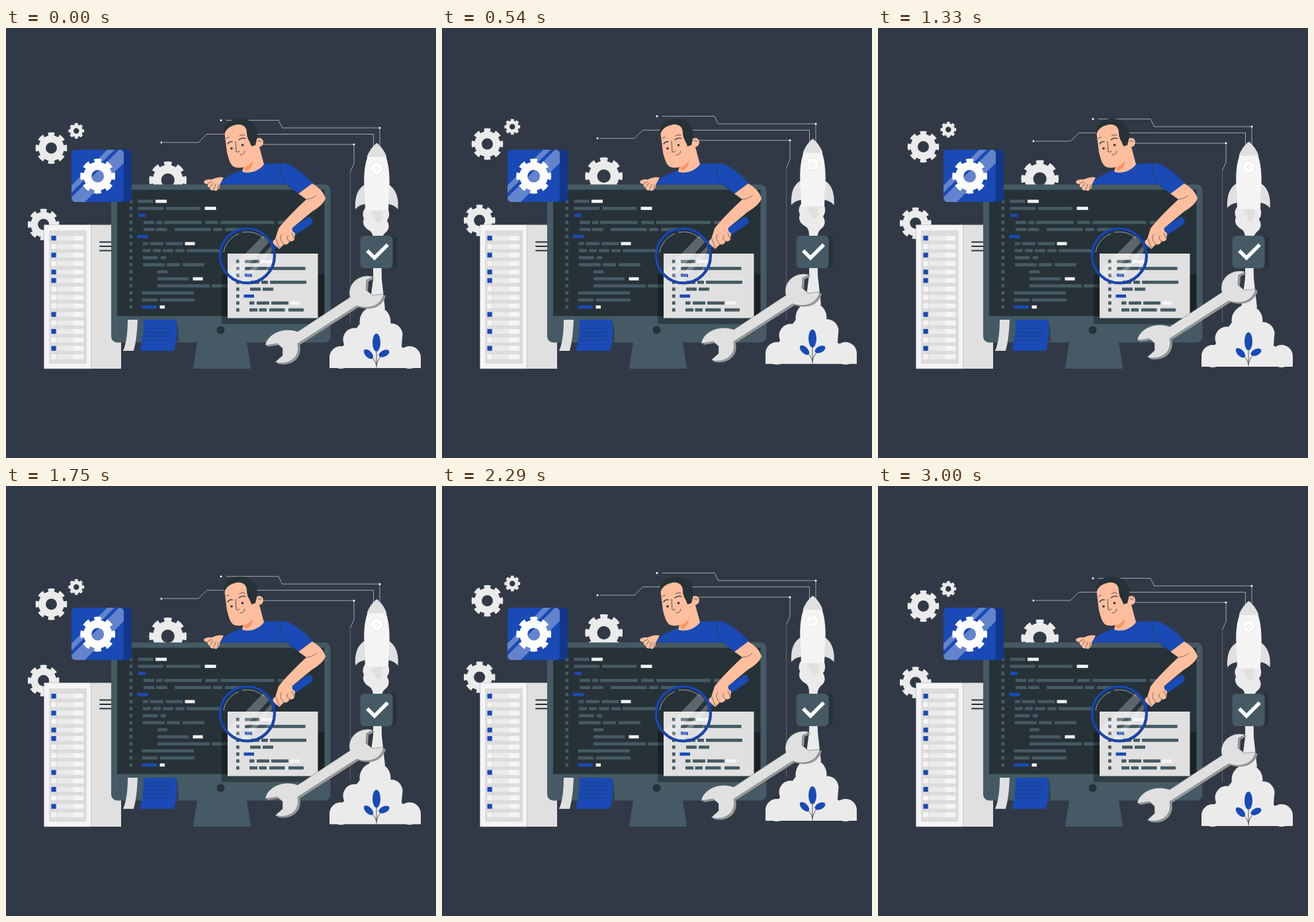
Animation, 650 px wide and 650 px high, one loop 3040 ms. Source, as an HTML page:

```html
<!DOCTYPE html>
<html lang="en">
<head>
<meta charset="utf-8">
<title>Debugging scene</title>
<style>
html, body { margin: 0; width: 100%; height: 100%; overflow: hidden; background: #323946; }
svg { display: block; width: 100vw; height: 100vh; }
.slate { fill: #455a64; }
.dark { fill: #263238; }
.blue { fill: #194ab5; }
.skin { fill: #ffbe9d; }
.grey { fill: #e0e0e0; }
.light { fill: #ebebeb; }
.pale { fill: #f5f5f5; }
.ink { fill: none; stroke: #263238; stroke-linecap: round; stroke-linejoin: round; }
.wire { fill: none; stroke: #d5d7da; stroke-width: .7; }
</style>
</head>
<body>
<svg viewBox="0 0 650 650">
<defs>
  <g id="gear" fill="none">
    <circle r="13.9" stroke-width="10.8"/>
    <circle r="21" stroke-width="5.6" pathLength="16" stroke-dasharray="1.15 .85" stroke-dashoffset=".575"/>
  </g>
  <path id="wrench" d="M555 376C537 371 519 383 519 401Q519 405 520 407L441 459C425 453 402 457 393 475L392 480L410 477L418 484V495L407 505C425 511 446 499 441 477L530 420C551 427 568 418 571 402L554 404L544 396L545 381Z"/>
  <clipPath id="card"><rect x="99" y="184" width="79" height="79" rx="6"/></clipPath>
  <clipPath id="lens"><circle cx="364.500" cy="344.500" r="39"/></clipPath>
</defs>

<g id="float">
  <g stroke="#ebebeb">
    <use href="#gear" transform="translate(68.500 181.500)"/>
    <use href="#gear" transform="translate(106.300 155.500) scale(.5)"/>
    <use href="#gear" transform="translate(244.700 230) scale(1.19)"/>
    <use href="#gear" transform="translate(56.700 297)"/>
  </g>
  <path class="wire" d="M333 139.500H412L417.500 151H565V180M238 173H291L303.500 160.500H555.500V185M380 176H526V205L520.500 217"/>
  <path class="wire" opacity=".4" d="M520.500 217V447"/>
  <g fill="#fff">
    <circle cx="325" cy="139.500" r="1.500"/><circle cx="235" cy="173" r="1.500"/>
    <circle cx="565" cy="151" r="1.500"/><circle cx="526" cy="176" r="1.500"/>
  </g>
  <!-- smoke -->
  <g class="light">
    <path d="M543 272H577Q582 283 576 291Q582 302 574 309Q568 313 567 324L568 380L573 425H549L555 380V320Q555 309 549 306Q537 299 541 288Q537 280 543 272Z"/>
    <circle cx="558" cy="444" r="23.500"/>
    <circle cx="527" cy="471" r="17.500"/><circle cx="582" cy="464" r="17.500"/>
    <circle cx="506" cy="498" r="17"/><circle cx="610" cy="498" r="17"/>
    <path d="M489 514V498L510 480L535 447H581L599 467L598 482L627 499V514Z"/>
  </g>
  <path class="grey" d="M553 276H569V288Q565 297 559 293Q558 285 552 283Z"/>
  <!-- rocket -->
  <path class="grey" d="M542 237C532 243 527 254 528 274Q534 267 543 266ZM579 237C588 243 594 254 592.500 274Q586 267 578 266Z"/>
  <path class="pale" d="M560.500 174C547 184 540 207 541.500 239L543 275.500H578L579.500 239C581 207 574 184 560.500 174Z"/>
  <path class="grey" d="M560.500 174Q550 182 545.500 195H575.500Q571 182 560.500 174Z"/>
  <circle cx="560.300" cy="212" r="9.500" fill="#fff" stroke="#e4e4e4"/>
  <path d="M555 215L562 208M559 217L565 211" stroke="#ebebeb" stroke-width="1.500"/>
  <path d="M543 251H578M543 264H578" stroke="#ebebeb" stroke-width=".6"/>
  <!-- sprout -->
  <path class="ink" stroke-width=".8" d="M560 476V513M560 509Q563 497 573 491M560 510Q558 500 547 493"/>
  <g class="blue">
    <ellipse rx="6" ry="13.500" transform="translate(560 475.500)"/>
    <ellipse rx="8.500" ry="4.800" transform="translate(571.500 492) rotate(-25)"/>
    <ellipse rx="9" ry="4.800" transform="translate(548 493) rotate(45)"/>
  </g>
</g>

<!-- server -->
<path class="grey" d="M128 297.500H174V515H128Z"/>
<path class="pale" d="M57.500 297.500H128.500V515H57.500Z" stroke="#9aa3a8" stroke-width=".5"/>
<path fill="#dcdcdc" d="M65 306H122V507.500H65Z"/>
<g id="slots"></g>
<path class="ink" stroke-width="2" d="M142 323.500H162M142 330H162M142 336.500H162"/>

<!-- monitor -->
<path class="slate" d="M289 475H364L370 515H283Z"/>
<rect class="slate" x="159" y="236.500" width="331.500" height="239" rx="9"/>
<path class="dark" d="M168 244.500H481.500V435.500H168Z"/>
<g id="code"></g>
<path d="M326 372H481.500V447.500H326Z" opacity=".32"/>
<path class="grey" d="M335 341H471.500V438.500H335Z"/>
<g id="note"></g>
<circle class="dark" cx="324.500" cy="456.500" r="6"/>

<!-- papers on the bezel -->
<path class="grey" d="M184 441H199Q198 470 193 488H177Q184 472 184 441Z"/>
<path class="dark" opacity=".7" d="M257 441Q262 458 260 476L255 470Z"/>
<path class="blue" d="M208 441H257Q261 464 254 488H202Q208 468 208 441Z"/>
<path class="ink" stroke-width=".5" d="M212 448H249M212 454H250M211 460H250M210 466H249M209 472H247"/>

<!-- app card -->
<rect x="112" y="184" width="78" height="79" rx="6" fill="#12378a"/>
<g clip-path="url(#card)">
  <path class="blue" d="M99 184H178V263H99Z"/>
  <path fill="#fff" opacity=".32" d="M153 184H164L99 249V238ZM171 184H178V204L119 263H99V256Z"/>
</g>
<use href="#gear" stroke="#fff" transform="translate(138.700 224) scale(1.11)"/>

<!-- check card -->
<rect class="dark" x="546" y="314" width="45" height="48.500" rx="6"/>
<rect class="slate" x="535.500" y="314" width="49" height="49" rx="6"/>
<path fill="none" stroke="#fff" stroke-width="5.500" d="M546 336.500L557 347.500L577 327.500"/>

<!-- magnifier -->
<g clip-path="url(#lens)">
  <path fill="#fff" opacity=".25" d="M389 313L398 323L346 381L334 370ZM401 329L405 334L361 386L353 384Z"/>
</g>
<path fill="none" stroke="#fff" stroke-width=".7" opacity=".8" d="M329 339A36 36 0 0 1 352 311M357 309A36 36 0 0 1 390 318M400 350A36 36 0 0 1 387 373"/>
<circle cx="365" cy="344.500" r="41" fill="none" stroke="#12378a" stroke-width="4"/>
<circle cx="364.300" cy="344" r="41" fill="none" stroke="#194ab5" stroke-width="2.700"/>
<path class="blue" d="M402 322L456 286Q462 284 464 293L461 297L407 333Z"/>

<!-- man -->
<path class="blue" d="M322 236.500Q330 224 357 215Q373 218 390 205L424 204.500Q447 215 464 235L442 250.500L424 236.500Z"/>
<path class="ink" stroke-width=".6" d="M416 207C412 225 424 240 442 250"/>
<path class="skin" d="M442 250.500L463 235Q480 245 483 258Q479 268 462 278L433 302Q431 307 437 310L436 320Q432 324 429 322Q426 329 420 327L413 334L404 326Q402 322 407 319L412 303Q425 286 454 259Z"/>
<path class="ink" stroke-width=".6" d="M454 259Q462 259 469 253M408 319L413 332M417 312Q411 318 420 327M426 314Q422 319 429 322M432 310L436 319"/>
<path class="skin" d="M374 178L383 180L390 206C382 217 367 221 357 217L362 198Z"/>
<path fill="#ff9360" d="M359 211Q369 208 373 200Q374 211 363 216Z"/>
<path class="skin" d="M330 156L334 188Q338 205 343 209C350 213 359 211 365 208Q374 200 378 182L382 180Q389 179 389 172Q387 164 379 167L372 144L341 145Z"/>
<path class="dark" d="M330 161Q327 149 338 141Q353 133 368 140Q380 147 380 162L379 169L377 177L371 179C369 171 364 168 364 158C364 149 357 145 349 146C340 148 333 151 330 161Z"/>
<path class="ink" stroke-width="1.300" d="M335 175Q338 171 342 172M352 169Q357 165 362 167"/>
<path class="ink" stroke-width=".8" d="M347 171L348 187Q351 189 353 186M354 192Q360 192 361 186M381 171Q384 169 386 172M333 167Q334 165 337 165M353 163Q357 160 361 162"/>
<circle class="dark" cx="341" cy="182" r="1.800"/><circle class="dark" cx="357.500" cy="177" r="1.800"/>
<path class="skin" d="M299 232Q303 228 311 229Q321 224 329 226L323 237Q323 243 320 244Q318 248 314 245Q309 247 308 241Q304 241 305 236Q299 236 299 232Z"/>
<path class="ink" stroke-width=".6" d="M305 235L311 232M309 240L313 234M314 244L317 236M320 243L321 237"/>

<g id="tool">
  <use href="#wrench" x="3" y="2" fill="#999"/>
  <use href="#wrench" fill="#e0e0e0" stroke="#455a64" stroke-width=".5"/>
</g>
</svg>
<script>
const $ = id => document.getElementById(id);
const fills = { g: 'slate', b: 'blue', w: 'pale', l: 'light' };
const bar = (x, y, w, h, c) => `<rect class="${fills[c]}" x="${x}" y="${y}" width="${w}" height="${h}"/>`;

// Each row lists bars as start+width, with an optional colour letter
function listing(id, rows, x, top, step) {
  $(id).innerHTML = rows.split('|').map((row, i) => {
    const y = top + i * step;
    return bar(x, y - 2.5, 4.7, 5, 'g') + row.split(' ').map(part => {
      const [, start, width, c = 'g'] = part.match(/([\d.]+)\+([\d.]+)(\w)?/);
      return bar(start, y - 2.4, width, 4.8, c);
    }).join('');
  }).join('');
}

listing('code', '199.5+23 226+17w|199.5+38.5 242+52 300.5+17w|200+11b|' +
  '208+16 227+9.5 239+57 301+19.5 324+82 411+25|208+16.5 227+16.5 255+54.5 313+14 331+30|198+16.5b|' +
  '207+7.5 217.5+20.5 241.5+26 270.5+15w|207+12 222+12 237+16 256+14 273+54|207+22.5 234+8|' +
  '207+33 243+20 267+33|229+15|229+47 282.5+15w|229+79 311+24|205.5+78.5|' +
  '205.5+23.5 232.5+52.5|205.5+22.5b 232.5+7.5w', 186.5, 262, 10.65);

listing('note', '361+22 386+16w|361+38 403+49.5|361+11b|370+13 386+10 399+55|369+16 388+16|' +
  '359.5+15.5b|368+7.5 379+19 401+26 430+14w|368+12 382.5+11.5 398+23.5 427+23', 348, 353, 10.45);

$('slots').innerHTML = [...'bwbwbbwwwbwbwbw'].map((c, i) => {
  const y = 314 + i * 12.82;
  return bar(68.5, y, 7.2, 7.2, c) + bar(77, y, 25, 7.2, 'l') + bar(102, y, 15, 7.2, 'w');
}).join('');

// Linear rise and fall
const lift = (t, period) => -8.5 * (1 - Math.abs(1 - 2 * (t % period) / period));

function draw() {
  const t = Math.min(performance.now() % 3040, 3000);
  $('float').setAttribute('transform', `translate(0 ${lift(t, 1500)})`);
  $('tool').setAttribute('transform', `translate(0 ${lift(t, 3000)})`);
  requestAnimationFrame(draw);
}
draw();
</script>
</body>
</html>
```
